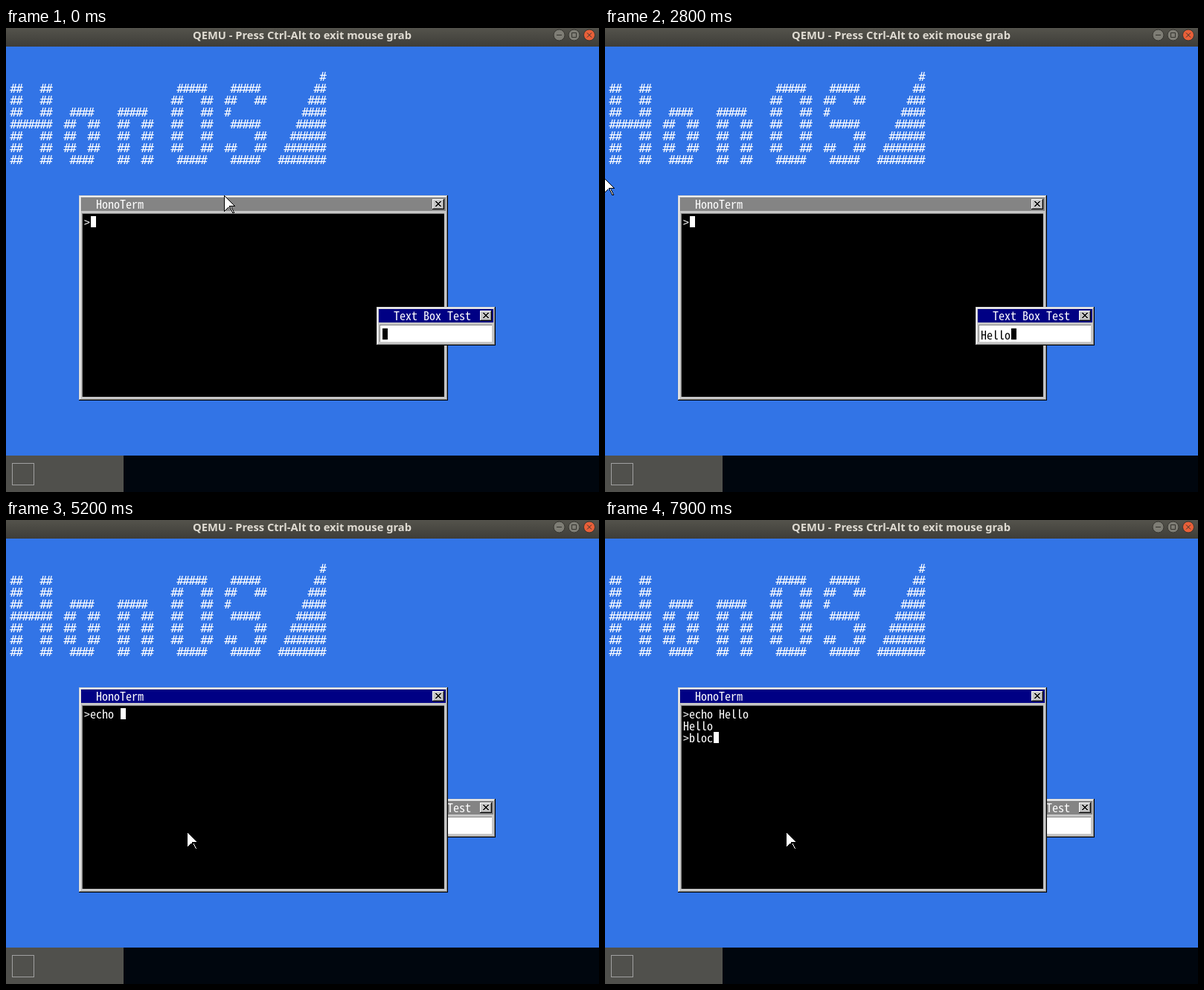
Animation, 797 px wide and 624 px high, one loop 8 s. Source, as an HTML page with a canvas:

```html
<!DOCTYPE html>
<html lang="en">
<head>
<meta charset="utf-8">
<title>Terminal demo</title>
<style>
html, body { margin: 0; width: 100%; height: 100%; overflow: hidden; background: #000; }
canvas { display: block; }
</style>
</head>
<body>
<canvas id="stage" width="797" height="624"></canvas>
<script>
const ctx = document.getElementById('stage').getContext('2d');
const LOOP = 8000, CELL = 8, LINE = 16;
const LIGHT = '#c6c6c6', DARK = '#848484', NAVY = '#000084';

// Choose the size whose advance equals one character cell.
const family = '"Noto Sans Mono CJK JP", "Noto Sans Mono", monospace';
ctx.font = `300 16px ${family}`;
const mono = `300 ${16 * CELL / ctx.measureText('0').width}px ${family}`;

const LOGO = [
  '',
  '##   ##                     #####    #####',
  '##   ##                    ##   ##  ##   ##',
  '##   ##   ####    #####    ##   ##  #',
  '#######  ##  ##   ##  ##   ##   ##   #####',
  '##   ##  ##  ##   ##  ##   ##   ##       ##',
  '##   ##  ##  ##   ##  ##   ##   ##  ##   ##',
  '##   ##   ####    ##  ##    #####    #####',
].map((row, i) => row.padEnd(52 - i) + '#'.repeat(i + 1));

// Key press times, and the spans in which each caret is hidden.
const BOX_KEYS = [1300, 1400, 1700, 1800, 1900];
const ECHO_KEYS = [4400, 4700, 4800, 4900, 5200, 5400, 5600, 5900, 6000, 6100];
const BLOCK_KEYS = [7000, 7200, 7300, 7900];
const ENTER = 6400, BLUR = 3400, RAISE = 3600;
const BOX_OFF = [[200, 700], [1200, 1300], [2300, 2800]];
const TERM_OFF = [[200, 700], [1200, 1700], [2300, 2800], [3400, 3700], [4200, 4400], [7400, 7900]];

// Pointer positions: time, x, y
const POINTER = [
  [0, 293, 225], [2600, 205, 195], [2700, 70, 166], [2800, -2, 201], [2900, 18, 262],
  [3000, 88, 340], [3100, 180, 400], [3200, 243, 422], [3600, 243, 419],
];

const typed = (text, keys, t) => text.slice(0, keys.filter(k => k <= t).length);
const hidden = (spans, t) => spans.some(([a, b]) => t >= a && t < b);

function rect(x, y, w, h, color) {
  ctx.fillStyle = color;
  ctx.fillRect(x, y, w, h);
}

function write(text, x, y, color) {
  ctx.font = mono;
  ctx.textAlign = 'left';
  ctx.fillStyle = color;
  ctx.fillText(text, x - 1, y + 14);
}

function closeButton(x, y) {
  rect(x, y, 16, 14, '#000');
  rect(x, y, 15, 13, '#fff');
  rect(x + 1, y + 1, 14, 12, DARK);
  rect(x + 1, y + 1, 13, 11, LIGHT);
  for (let i = 0; i < 7; i++) {
    const d = Math.min(i, 6 - i);
    rect(x + 4 + d, y + 3 + i, 2, 1, '#000');
    rect(x + 10 - d, y + 3 + i, 2, 1, '#000');
  }
}

function frame(x, y, w, h, title, active, fill) {
  rect(x, y, w, h, '#000');
  rect(x, y, w - 1, h - 1, LIGHT);
  rect(x + 1, y + 1, w - 2, h - 2, DARK);
  rect(x + 1, y + 1, w - 3, h - 3, '#fff');
  rect(x + 2, y + 2, w - 4, h - 4, LIGHT);
  rect(x + 3, y + 3, w - 6, 18, active ? NAVY : DARK);
  write(title, x + 24, y + 4, '#fff');
  closeButton(x + w - 21, y + 5);
  rect(x + 4, y + 24, w - 9, h - 29, DARK);
  rect(x + 5, y + 25, w - 10, h - 30, fill);
}

function terminal(t) {
  frame(98, 225, 496, 276, 'HonoTerm', t >= RAISE, '#000');
  const lines = ['>' + typed('echo Hello', ECHO_KEYS, t)];
  if (t >= ENTER) lines.push('Hello', '>' + typed('bloc', BLOCK_KEYS, t));
  lines.forEach((line, i) => write(line, 106, 253 + i * LINE, '#fff'));
  const row = lines.length - 1;
  if (!hidden(TERM_OFF, t)) rect(106 + lines[row].length * CELL, 253 + row * LINE, 7, 15, '#fff');
}

function textBox(t) {
  frame(498, 375, 160, 52, 'Text Box Test', t < BLUR, '#fff');
  const text = typed('Hello', BOX_KEYS, t);
  write(text, 506, 405, '#000');
  if (!hidden(BOX_OFF, t)) rect(506 + text.length * CELL, 404, 7, 15, '#000');
}

// Arrow outline in black, one pixel wide, around a white body with a slanted tail.
function pointer(t) {
  const [, x, y] = POINTER.filter(p => p[0] <= t).pop();
  const span = (col, row, w) => {
    rect(x + col, y + row, w, 1, '#000');
    if (w > 2) rect(x + col + 1, y + row, w - 2, 1, '#fff');
  };
  for (let r = 0; r < 14; r++) span(0, r, r + 1);
  rect(x, y + 14, 15, 1, '#000');
  rect(x + 1, y + 14, 6, 1, '#fff');
  [8, 6, 5, 4, 3, 2, 1].forEach((w, i) => span(0, 15 + i, w));
  for (let r = 16; r < 23; r++) span(r >> 1, r, 3);
  rect(x + 11, y + 23, 3, 1, '#000');
}

// The art is set in a wider face, one slanted mark centred in each cell.
function logo() {
  ctx.font = '16px "DejaVu Sans Mono", monospace';
  ctx.textAlign = 'center';
  ctx.fillStyle = '#fff';
  LOGO.forEach((row, i) => [...row].forEach((mark, col) => {
    ctx.fillText(mark, 6 + (col + 0.5) * CELL, 71 + i * LINE);
  }));
}

function windowButton(x, color, mark) {
  ctx.beginPath();
  ctx.arc(x, 9.5, 7.5, 0, 7);
  ctx.fillStyle = color;
  ctx.fill();
  ctx.strokeStyle = '#35342f';
  ctx.lineWidth = 1;
  ctx.stroke();
  ctx.stroke(new Path2D(mark));
}

function desktop() {
  rect(0, 0, 797, 624, '#3274e6');
  const bar = ctx.createLinearGradient(0, 0, 0, 25);
  bar.addColorStop(0, '#54534c');
  bar.addColorStop(1, '#3e3d38');
  rect(0, 0, 797, 25, bar);
  ctx.font = 'bold 14.7px "Noto Sans", "Open Sans", sans-serif';
  ctx.textAlign = 'center';
  ctx.fillStyle = '#dfdbd2';
  ctx.fillText('QEMU - Press Ctrl-Alt to exit mouse grab', 398, 15);
  windowButton(743.5, '#7e7d75', 'M740 9.5h7');
  windowButton(763.5, '#7e7d75', 'M760.5 6.5h6v6h-6z');
  windowButton(784, '#ea6039', 'M781 6.5l6 6m0-6l-6 6');

  logo();
  rect(0, 575, 797, 49, '#00060e');
  rect(0, 575, 158, 49, '#50504c');
  ctx.strokeStyle = '#a0a0a0';
  ctx.lineWidth = 1;
  ctx.strokeRect(8.5, 585.5, 29, 29);
}

function draw(now) {
  const t = now % LOOP;
  desktop();
  const order = t < RAISE ? [terminal, textBox] : [textBox, terminal];
  order.forEach(paint => paint(t));
  pointer(t);
  requestAnimationFrame(draw);
}
draw(performance.now());
</script>
</body>
</html>
```
